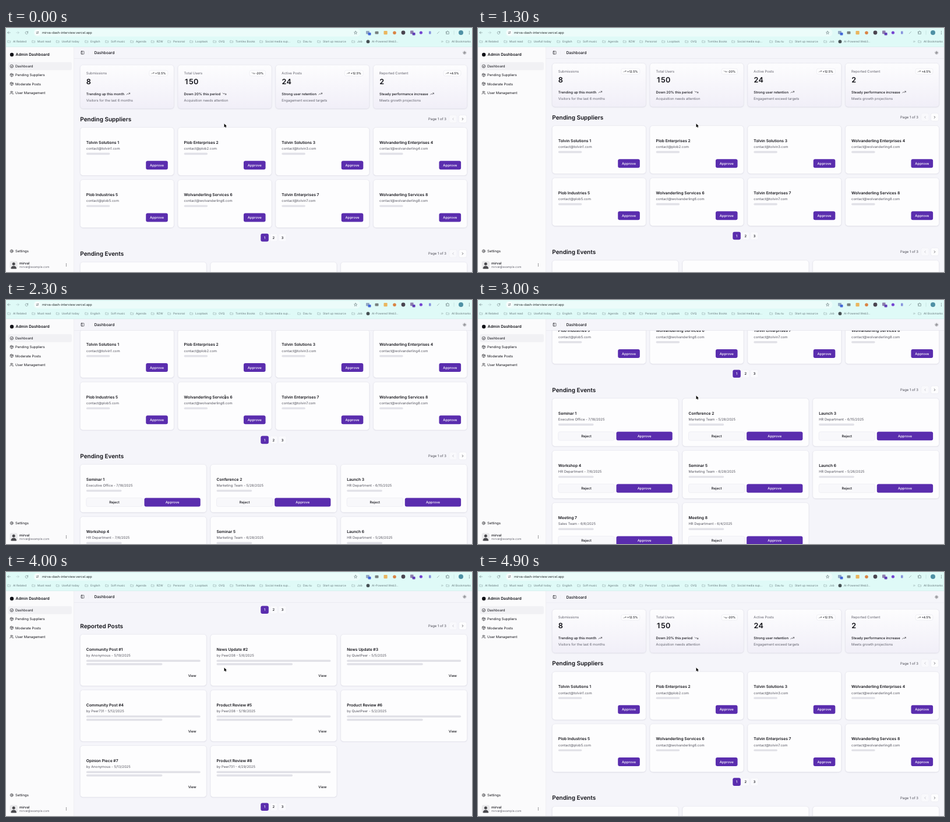
These frames come from a looping animation (800 px wide and 421 px high, 5 s). An HTML page with a canvas:

```html
<!DOCTYPE html>
<html lang="en">
<head>
<meta charset="utf-8">
<title>Admin Dashboard</title>
<style>
html, body { margin: 0; width: 100%; height: 100%; overflow: hidden; background: #f5f5fa; }
canvas { display: block; width: 800px; height: 421px; }
</style>
</head>
<body>
<canvas id="stage"></canvas>
<script>
const W = 800, H = 421, LOOP = 5000, STEP = 100;
const INK = '#111117', MUTED = '#62626d', PURPLE = '#5a2dae', BAR = '#e1e1e7', LINE = '#e3e3eb';
const SM = 5.91, XS = 5.07, MD = 6.72;
const LEFT = 127.3, INNER = 664.3, GAP = 6.75, PAD = 10.5;
const POINTER = { x: 374.6, y: 165 };

const canvas = document.getElementById('stage');
const dpr = window.devicePixelRatio || 1;
canvas.width = W * dpr;
canvas.height = H * dpr;
const ctx = canvas.getContext('2d');
let scroll = 0, overText = false, tracking = false;

// Scroll position over time: [ms, px]
const KEYS = [[0, 0], [1100, 0], [1900, 38], [2300, 120.2], [3000, 234.3], [3800, 618.7],
  [4100, 618.7], [4650, 0], [4750, -1.6], [4900, -0.5], [5000, 0]];
const slopes = KEYS.slice(1).map((k, i) => (k[1] - KEYS[i][1]) / (k[0] - KEYS[i][0]));
const tangents = KEYS.map((_, i) => {
  const a = slopes[i - 1] || 0, b = slopes[i] || 0;
  return a * b > 0 ? 2 * a * b / (a + b) : 0;
});

function scrollAt(t) {
  let i = 0;
  while (i < KEYS.length - 2 && t > KEYS[i + 1][0]) i++;
  const [t0, a] = KEYS[i], [t1, b] = KEYS[i + 1];
  const d = t1 - t0, u = (t - t0) / d, v = 1 - u;
  return v * v * (1 + 2 * u) * a + u * v * v * d * tangents[i]
    + u * u * (3 - 2 * u) * b - u * u * v * d * tangents[i + 1];
}

function box(x, y, w, h, r, fill, stroke, lw = 0.5) {
  ctx.beginPath();
  ctx.roundRect(x, y, w, h, r);
  if (fill) { ctx.fillStyle = fill; ctx.fill(); }
  if (stroke) { ctx.strokeStyle = stroke; ctx.lineWidth = lw; ctx.stroke(); }
}

function disc(x, y, r, fill) {
  ctx.beginPath();
  ctx.arc(x, y, r, 0, Math.PI * 2);
  ctx.fillStyle = fill;
  ctx.fill();
}

// y is the middle of the capitals
function text(s, x, y, size = SM, weight = 400, color = INK, align = 'left') {
  ctx.font = `${weight} ${size}px Inter, "Liberation Sans", sans-serif`;
  ctx.textAlign = align;
  ctx.fillStyle = color;
  ctx.fillText(s, x, y + size * 0.36);
  const w = ctx.measureText(s).width;
  if (tracking && align === 'left') {
    const dx = POINTER.x - x, dy = POINTER.y - (y - scroll);
    if (dx > 0 && dx < w && Math.abs(dy) < size * 0.6) overText = true;
  }
  return w;
}

// Icons live on a 24 unit grid, placed by their centre
const ICONS = {
  up: 'M22 7L13.5 15.5L8.5 10.5L2 17M16 7H22V13',
  down: 'M22 17L13.5 8.5L8.5 13.5L2 7M16 17H22V11',
  prev: 'M15 18L9 12L15 6',
  next: 'M9 18L15 12L9 6',
  panel: 'M5 3H19Q21 3 21 5V19Q21 21 19 21H5Q3 21 3 19V5Q3 3 5 3ZM9 3V21',
  sun: 'M16 12A4 4 0 1 1 8 12A4 4 0 1 1 16 12M12 2V4M12 20V22M2 12H4M20 12H22M5 5L6.4 6.4M17.6 17.6L19 19M5 19L6.4 17.6M17.6 6.4L19 5',
  gauge: 'M22 12A10 10 0 1 1 2 12A10 10 0 1 1 22 12M12 15L16 8M7 12H9M10 16H14',
  pack: 'M12 2L21 7V17L12 22L3 17V7ZM3 7L12 12L21 7M12 12V22M7.5 4.5L16.5 9.5',
  users: 'M13 7A4 4 0 1 1 5 7A4 4 0 1 1 13 7M2 21V19Q2 15 6 15H12Q16 15 16 19V21M16 3.2A4 4 0 0 1 16 10.8M22 21V19Q22 16 19 15.2',
  gear: 'M20 12A8 8 0 1 1 4 12A8 8 0 1 1 20 12M14 12A2 2 0 1 1 10 12A2 2 0 1 1 14 12M12 2V4M12 20V22M2 12H4M20 12H22M5 5L6.4 6.4M17.6 17.6L19 19M5 19L6.4 17.6M17.6 6.4L19 5',
  back: 'M21 12H3M11 4L3 12L11 20',
  fwd: 'M3 12H21M13 4L21 12L13 20',
  reload: 'M20 9A9 9 0 1 0 21 13M21 3V9H15',
  tune: 'M3 7H12M21 17H12M20 7A3 3 0 1 1 14 7A3 3 0 1 1 20 7M10 17A3 3 0 1 1 4 17A3 3 0 1 1 10 17',
  star: 'M12 2L15 9L22 9.5L16.7 14L18.5 21.5L12 17.3L5.5 21.5L7.3 14L2 9.5L9 9Z',
  folder: 'M2 5H9L12 8H22V20H2Z',
  puzzle: 'M4 7H9Q8 2 12 2Q16 2 15 7H20V20H4V15Q8 16 8 13Q8 10 4 11Z',
  pen: 'M5 19L18 6',
  chevrons: 'M4 6L10 12L4 18M13 6L19 12L13 18'
};
for (const k in ICONS) ICONS[k] = new Path2D(ICONS[k]);

function icon(name, cx, cy, size = 6.75, color = INK, lw = 2) {
  ctx.save();
  ctx.translate(cx - size / 2, cy - size / 2);
  ctx.scale(size / 24, size / 24);
  ctx.lineWidth = lw;
  ctx.lineCap = ctx.lineJoin = 'round';
  ctx.strokeStyle = color;
  ctx.stroke(ICONS[name]);
  ctx.restore();
}

function card(x, y, w, h, fill = '#fdfdfe') {
  ctx.save();
  ctx.shadowColor = 'rgba(30, 25, 70, 0.13)';
  ctx.shadowBlur = 2 * dpr;
  ctx.shadowOffsetY = 0.6 * dpr;
  box(x, y, w, h, 5, fill);
  ctx.restore();
  box(x, y, w, h, 5, null, LINE);
}

function button(label, x, y, w, h, primary) {
  box(x, y, w, h, 3, primary ? PURPLE : '#f8f8fb', primary ? null : LINE);
  text(label, x + w / 2, y + h / 2, SM, 500, primary ? '#fff' : INK, 'center');
}

function heading(label, y) {
  text(label, LEFT, y, 10, 600);
  text('Page 1 of 3', 756, y, SM, 400, '#4b4b55', 'right');
  box(760.7, y - 6.9, 13.6, 13.6, 3, '#f9f9fc', '#ebebf1');
  icon('prev', 767.5, y, 6.75, '#a5a5ae');
  box(777.3, y - 6.9, 13.6, 13.6, 3, '#fdfdfe', LINE);
  icon('next', 784, y);
}

function pager(y) {
  for (let i = 0; i < 3; i++) {
    const x = 444.1 + i * 15.2;
    box(x - 6.8, y - 6.8, 13.6, 13.6, 3, i ? '#fafafd' : PURPLE, i ? '#ededf3' : null);
    text(i + 1, x, y, SM, 500, i ? INK : '#fff', 'center');
  }
}

function grid(items, cols, top, pitch, draw) {
  const w = (INNER - GAP * (cols - 1)) / cols;
  items.forEach((item, i) => {
    const x = LEFT + (i % cols) * (w + GAP), y = top + Math.floor(i / cols) * pitch;
    draw(item, x, y, w, i + 1);
  });
}

const STATS = [
  ['Submissions', '8', '+12.5%', 'Trending up this month', 'Visitors for the last 6 months'],
  ['Total Users', '150', '-20%', 'Down 20% this period', 'Acquisition needs attention'],
  ['Active Posts', '24', '+12.5%', 'Strong user retention', 'Engagement exceed targets'],
  ['Reported Content', '2', '+4.5%', 'Steady performance increase', 'Meets growth projections']
];
const SUPPLIERS = ['Tolvin Solutions', 'Plob Enterprises', 'Tolvin Solutions', 'Wolvanderling Enterprises',
  'Plob Industries', 'Wolvanderling Services', 'Tolvin Enterprises', 'Wolvanderling Services'];
const EVENTS = [
  ['Seminar', 'Executive Office', '7/18'], ['Conference', 'Marketing Team', '5/28'],
  ['Launch', 'HR Department', '6/15'], ['Workshop', 'HR Department', '7/6'],
  ['Seminar', 'Marketing Team', '6/28'], ['Launch', 'HR Department', '5/26'],
  ['Meeting', 'Sales Team', '6/6'], ['Meeting', 'HR Department', '6/4']
];
const POSTS = [
  ['Community Post', 'Anonymous', '5/19'], ['News Update', 'Peer208', '5/6'],
  ['News Update', 'QuietPeer', '5/5'], ['Community Post', 'Peer731', '5/12'],
  ['Product Review', 'Peer208', '5/19'], ['Product Review', 'QuietPeer', '5/2'],
  ['Opinion Piece', 'Anonymous', '5/13'], ['Product Review', 'Peer731', '4/29']
];

function statCard([label, value, change, trend, note], x, y, w) {
  const fill = ctx.createLinearGradient(0, y, 0, y + 75);
  fill.addColorStop(0, '#fdfdfe');
  fill.addColorStop(1, '#f1eff8');
  card(x, y, w, 75.3, fill);
  const tx = x + PAD, dir = change[0] === '-' ? 'down' : 'up';
  text(label, tx, y + 13.7, SM, 400, MUTED);
  [...value].forEach((c, i) => text(c, tx + 4.1 + i * 8.2, y + 28.3, 12.67, 600, INK, 'center'));

  ctx.font = `500 ${XS}px Inter, "Liberation Sans", sans-serif`;
  const bw = ctx.measureText(change).width + 13.9, bx = x + w - PAD - bw;
  box(bx, y + 9.3, bw, 9.7, 3, '#fdfdfe', LINE);
  icon(dir, bx + 6.2, y + 14.2, XS);
  text(change, bx + 10.3, y + 14.2, XS, 500);

  const tw = text(trend, tx, y + 50, SM, 500);
  icon(dir, tx + tw + 6.8, y + 49.8);
  text(note, tx, y + 61, SM, 400, MUTED);
}

function itemCard(x, y, w, h, title, sub) {
  card(x, y, w, h);
  text(title, x + PAD, y + 25.7, MD, 600);
  text(sub, x + PAD, y + 36.6, SM, 400, '#55555f');
}

function supplierCard(name, x, y, w, n) {
  const host = name.split(' ')[0].toLowerCase();
  itemCard(x, y, w, 83, `${name} ${n}`, `contact@${host}${n}.com`);
  box(x + PAD, y + 43.8, 40.6, 3.4, 1.7, BAR);
  button('Approve', x + w - PAD - 37.6, y + 57.8, 37.6, 15, true);
}

function eventCard([kind, team, day], x, y, w, n) {
  itemCard(x, y, w, 83, `${kind} ${n}`, `${team} - ${day}/2025`);
  box(x + PAD, y + 43.8, 60.8, 3.4, 1.7, BAR);
  const bw = (w - 2 * PAD - 3.4) / 2;
  button('Reject', x + PAD, y + 57.8, bw, 15, false);
  button('Approve', x + w - PAD - bw, y + 57.8, bw, 15, true);
}

function postCard([kind, author, day], x, y, w, n) {
  const inner = w - 2 * PAD;
  itemCard(x, y, w, 89, `${kind} #${n}`, `by ${author} - ${day}/2025`);
  box(x + PAD, y + 44, inner, 3.4, 1.7, BAR);
  box(x + PAD, y + 49.8, inner * 2 / 3, 3.4, 1.7, BAR);
  text('View', x + w - PAD - 14.1, y + 71.1, SM, 500, INK, 'center');
}

function content() {
  ctx.save();
  ctx.beginPath();
  ctx.rect(117, 52.6, W, H);
  ctx.clip();
  ctx.translate(0, -scroll);
  tracking = true;
  grid(STATS, 4, 63.8, 0, statCard);
  heading('Pending Suppliers', 157);
  grid(SUPPLIERS, 4, 171.5, 90.1, supplierCard);
  pager(361.6);
  heading('Pending Events', 389.3);
  grid(EVENTS, 3, 403.8, 90.1, eventCard);
  pager(683.9);
  heading('Reported Posts', 711.7);
  grid(POSTS, 3, 726.2, 96, postCard);
  pager(1024);
  tracking = false;
  ctx.restore();
}

function header() {
  ctx.save();
  ctx.translate(0, Math.max(0, -scroll));
  box(117, 52.2, W - 117, 0.5, 0, '#e2e2ea');
  icon('panel', 131.4, 42.6);
  box(141.3, 39.2, 0.4, 6.8, 0, '#e6e6ec');
  text('Dashboard', 151.4, 42.8, MD, 500);
  icon('sun', 787.2, 42.7, 6.5);
  ctx.restore();
}

function sidebar() {
  box(0, 33, 116.6, H - 33, 0, '#fbfbfc');
  box(116.4, 33, 0.5, H - 33, 0, '#e5e5eb');
  disc(10, 46, 3.2, INK);
  text('Admin Dashboard', 16.6, 46, MD, 600);
  box(3.4, 59.1, 109.5, 13.6, 2.6, '#f1f1f4');
  [['gauge', 'Dashboard'], ['pack', 'Pending Suppliers'], ['pack', 'Moderate Posts'], ['users', 'User Management']]
    .forEach(([name, label], i) => {
      const y = 66 + i * 15.2;
      icon(name, 9.8, y);
      text(label, 16, y);
    });
  icon('gear', 9.8, 385);
  text('Settings', 16, 385);

  ctx.save();
  box(6.6, 402, 13.2, 13.4, 3, '#e9e9eb');
  ctx.clip();
  disc(13.2, 407, 2.5, '#4a4a4e');
  ctx.beginPath();
  ctx.ellipse(13.2, 415, 4.8, 4.6, 0, 0, Math.PI * 2);
  ctx.fill();
  ctx.restore();
  text('mirval', 23, 405.5, SM, 500);
  text('mirval@example.com', 23, 412.4, XS, 400, MUTED);
  for (const d of [-2, 0, 2]) disc(103.4, 408.8 + d, 0.55, INK);
}

const MARKS = [[12, 'AI Related'], [54, 'Must read'], [95.5, 'Usefull today'], [145, 'English'], [180, 'Soft music'],
  [223, 'Agenda'], [258.5, 'RZW'], [287, 'Personal'], [325, 'Looptask'], [365, 'OVQ'], [394, 'TomVex Books'],
  [445, 'Social media sup...'], [510, 'Dau tu'], [544, 'Start up resource'], [603, 'Job']];

function browser() {
  const grey = '#54666a', label = '#66787c';
  box(0, 0, W, 33, 0, '#dffaf7');
  box(0, 32.6, W, 0.5, 0, '#d3e8e7');
  icon('back', 5, 8, 6, grey);
  icon('fwd', 20, 8, 6, '#a3b6b8');
  icon('reload', 35.4, 8, 6, grey);
  box(47.5, 1.4, 561, 13.4, 6.7, '#ecfcfa');
  disc(54, 8, 4.8, '#fbffff');
  icon('tune', 54, 8, 5.5, '#333d40');
  text('mirva-dash-interview.vercel.app', 62, 8, 5.6, 400, '#22292b');
  icon('star', 600.2, 8, 6.4, grey);

  box(618, 5, 6, 5.6, 1, '#93a9c4');
  box(621.5, 8, 5, 4.5, 1, '#4468d8');
  box(633.5, 5.8, 6, 4.8, 1, '#77807f');
  box(648.5, 5, 6.2, 6.2, 1, '#eab65f');
  disc(667, 8.2, 2.8, '#d98445');
  disc(682, 8, 3.4, '#4b4550');
  box(694, 4.6, 5.6, 5.6, 1, '#8d7fae');
  box(697.6, 8, 5, 4.5, 1, '#6240b8');
  disc(712.4, 8, 2.6, '#7546d2');
  box(726, 5.6, 3.6, 5, 0.8, '#8792dc');
  icon('pen', 742, 8, 6, '#6c7a7e');
  icon('puzzle', 758, 8, 7, grey);
  box(768.8, 4.5, 0.5, 7, 0, '#b2cfd0');
  disc(781, 8, 4, '#4f91a5');
  for (const d of [-2.2, 0, 2.2]) disc(795.4, 8 + d, 0.6, grey);

  for (const [x, s] of MARKS) {
    icon('folder', x - 6.6, 23.3, 5.4, '#7c9194');
    text(s, x, 23.5, 4.85, 400, label);
  }
  disc(621.5, 23.4, 2.9, '#454f53');
  text('AI-Powered Web3...', 628, 23.5, 4.85, 400, label);
  icon('chevrons', 749, 23.4, 4.5, grey);
  icon('folder', 758.4, 23.3, 5.4, '#7c9194');
  text('All Bookmarks', 765, 23.5, 4.85, 400, label);
}

const ARROW = new Path2D('M0 0V6.2L1.5 4.9L2.5 7L3.4 6.6L2.5 4.5H4.4Z');
const BEAM = new Path2D('M-1 -3H1M0 -3V3M-1 3H1');

function pointer() {
  ctx.save();
  ctx.lineJoin = 'round';
  if (overText) {
    ctx.translate(376, 167.2);
    ctx.strokeStyle = '#111';
    ctx.lineWidth = 0.6;
    ctx.stroke(BEAM);
  } else {
    ctx.translate(POINTER.x, POINTER.y);
    ctx.strokeStyle = '#fff';
    ctx.lineWidth = 0.9;
    ctx.stroke(ARROW);
    ctx.fillStyle = '#000';
    ctx.fill(ARROW);
  }
  ctx.restore();
}

function render(t) {
  scroll = scrollAt(t);
  overText = false;
  ctx.setTransform(dpr, 0, 0, dpr, 0, 0);
  ctx.textRendering = 'geometricPrecision';
  box(0, 0, W, H, 0, '#f5f5fa');
  content();
  header();
  sidebar();
  browser();
  pointer();
}

const start = performance.now();
function tick() {
  const t = (performance.now() - start) % LOOP;
  render(Math.floor(t / STEP) * STEP);
  requestAnimationFrame(tick);
}
tick();
</script>
</body>
</html>
```
